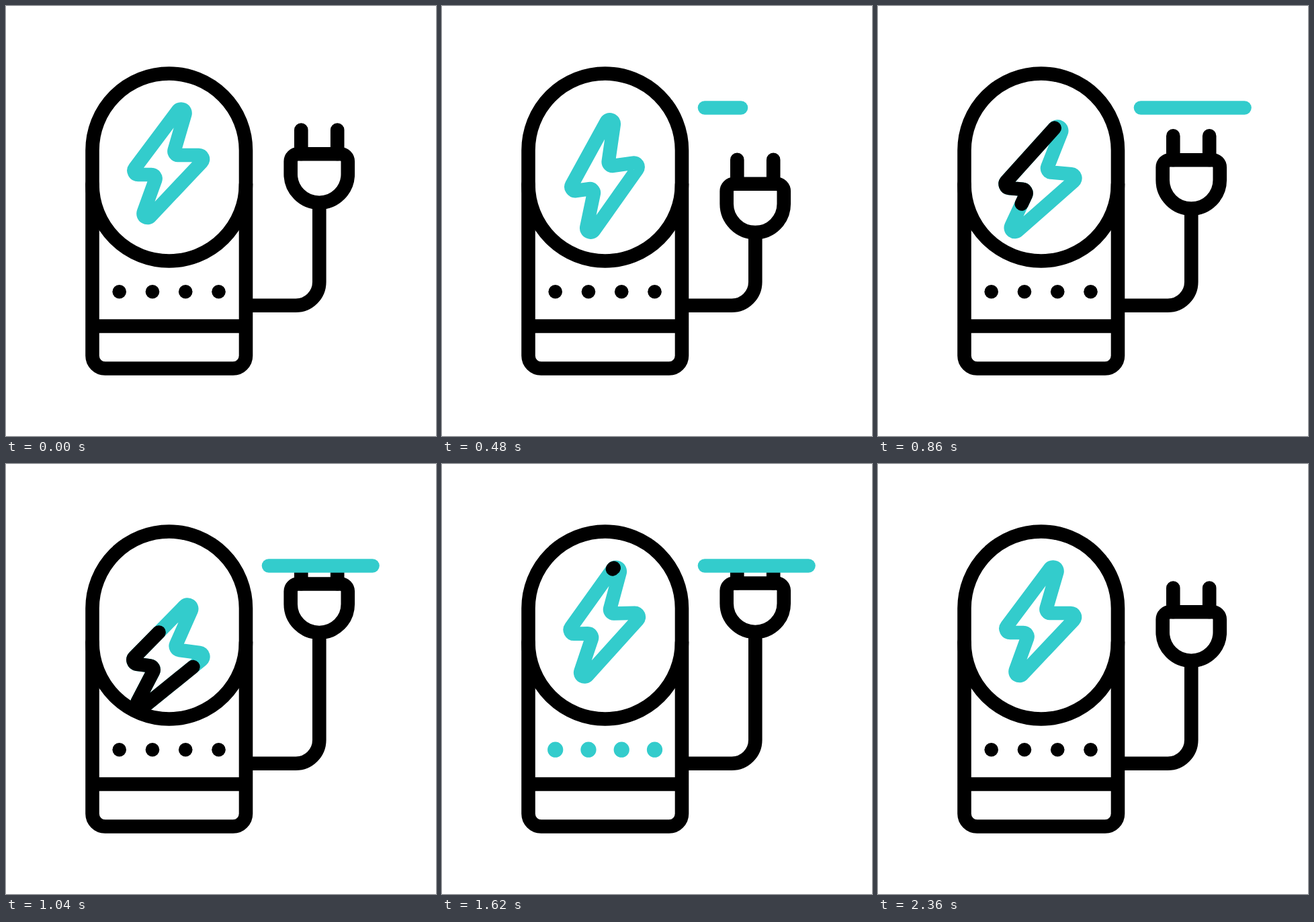
Write an HTML page that moves like this. It is 640 px wide and 640 px high and loops after 2400 ms.

```html
<!DOCTYPE html>
<html lang="en">
<head>
<meta charset="utf-8">
<title>Charging station</title>
<style>
  html, body { margin: 0; width: 100%; height: 100%; overflow: hidden; background: #fff; }
  svg { display: block; width: 100vw; height: 100vh; }
  .ink, .teal { fill: none; stroke-width: 20.6; stroke-linecap: round; stroke-linejoin: round; }
  .ink { stroke: #000; }
  .teal { stroke: #3cc; }
  .flat { stroke-linecap: butt; }
</style>
</head>
<body>
<svg viewBox="0 0 640 640">
  <defs>
    <path id="shell" d="M128.5 214.75a114.25 114.25 0 0 1 228.5 0V265.25a114.25 114.25 0 0 1 -228.5 0Z"/>
    <path id="zap" pathLength="1" d="M255.7 155.9L191.7 241.4A6 6 0 0 0 196.5 251H216.5A6 6 0 0 1 222.2 258.9L204.8 307.1A6 6 0 0 0 214.9 313.1L291.4 232.1A6 6 0 0 0 287 222H256.5A6 6 0 0 1 250.7 214.4L266.3 161.1A6 6 0 0 0 255.7 155.9Z"/>
    <clipPath id="window"><use href="#shell"/></clipPath>
    <clipPath id="below"><rect y="151.5" width="640" height="489"/></clipPath>
  </defs>

  <path id="cable" class="ink flat"/>
  <g clip-path="url(#below)">
    <g id="plug" class="ink">
      <path d="M439.3 184.5V220M493.2 184.5V220"/>
      <path d="M434.7 220.3H497.8a11 11 0 0 1 11 11V250.2a42.55 42.55 0 0 1 -85.1 0V231.3a11 11 0 0 1 11 -11Z"/>
    </g>
  </g>
  <path id="wall" class="teal" pathLength="1" d="M391 151.5H545.5"/>

  <g clip-path="url(#window)">
    <g id="bolt">
      <use href="#zap" class="teal"/>
      <use href="#zap" class="ink" id="sweep"/>
    </g>
  </g>
  <use href="#shell" class="ink"/>
  <path class="ink" d="M128.5 265V520.5a19 19 0 0 0 19 19H338a19 19 0 0 0 19 -19V265M128.5 476.5H357"/>
  <g id="lamps"></g>
</svg>
<script>
const LOOP = 2400;
const $ = id => document.getElementById(id);

// Keys are [time, ...values], eased in and out between neighbours.
const PLUG = [[95, 0], [632, 55], [1135, -51.5], [1360, -51.5], [2360, 0]];
const BOLT = [[0, 0, 0], [333, 52, -14], [667, -28.2, 0.3], [1000, 55, 8.2],
              [1340, -18.1, -6.3], [1840, 14, 2.2], [2333, 0, 0]];
const WALL = { head: [[266, 0], [806, 1]], tail: [[1867, 0], [2333, 1]] };
const SWEEP = { head: [[526, 0], [1348, 1]], tail: [[872, 0], [1654, 1]] };
const LAMP = { x: 168.7, gap: 49.27, on: 1133, off: 1833, lag: 100 };

function at(keys, t, col = 1) {
  const i = keys.findIndex(k => k[0] > t);
  if (i === 0) return keys[0][col];
  if (i < 0) return keys[keys.length - 1][col];
  const a = keys[i - 1], b = keys[i];
  const p = (t - a[0]) / (b[0] - a[0]);
  return a[col] + (b[col] - a[col]) * p * p * (3 - 2 * p);
}

function trim(el, { head, tail }, t) {
  const a = at(tail, t), b = at(head, t);
  el.style.display = b > a ? '' : 'none';
  el.style.strokeDasharray = `${b - a} 2`;
  el.style.strokeDashoffset = -a;
}

const lamps = Array.from({ length: 4 }, (_, i) => {
  const c = document.createElementNS('http://www.w3.org/2000/svg', 'circle');
  c.setAttribute('cx', LAMP.x + i * LAMP.gap);
  c.setAttribute('cy', 425.2);
  return $('lamps').appendChild(c);
});

function draw(t) {
  const dy = at(PLUG, t);
  $('plug').setAttribute('transform', `translate(0 ${dy})`);
  $('cable').setAttribute('d', `M357 445.7H431.3a35 35 0 0 0 35 -35V${292 + dy}`);
  trim($('wall'), WALL, t);

  $('bolt').setAttribute('transform',
    `translate(0 ${at(BOLT, t)}) rotate(${at(BOLT, t, 2)} 235.7 234.2)`);
  trim($('sweep'), SWEEP, t);

  lamps.forEach((c, i) => {
    const s = t - i * LAMP.lag;
    const lit = s >= LAMP.on && s < LAMP.off;
    c.setAttribute('r', lit ? 11.6 : 10.3);
    c.setAttribute('fill', lit ? '#3cc' : '#000');
  });
}

const start = performance.now();
function tick() {
  draw((performance.now() - start) % LOOP);
  requestAnimationFrame(tick);
}
tick();
</script>
</body>
</html>
```
